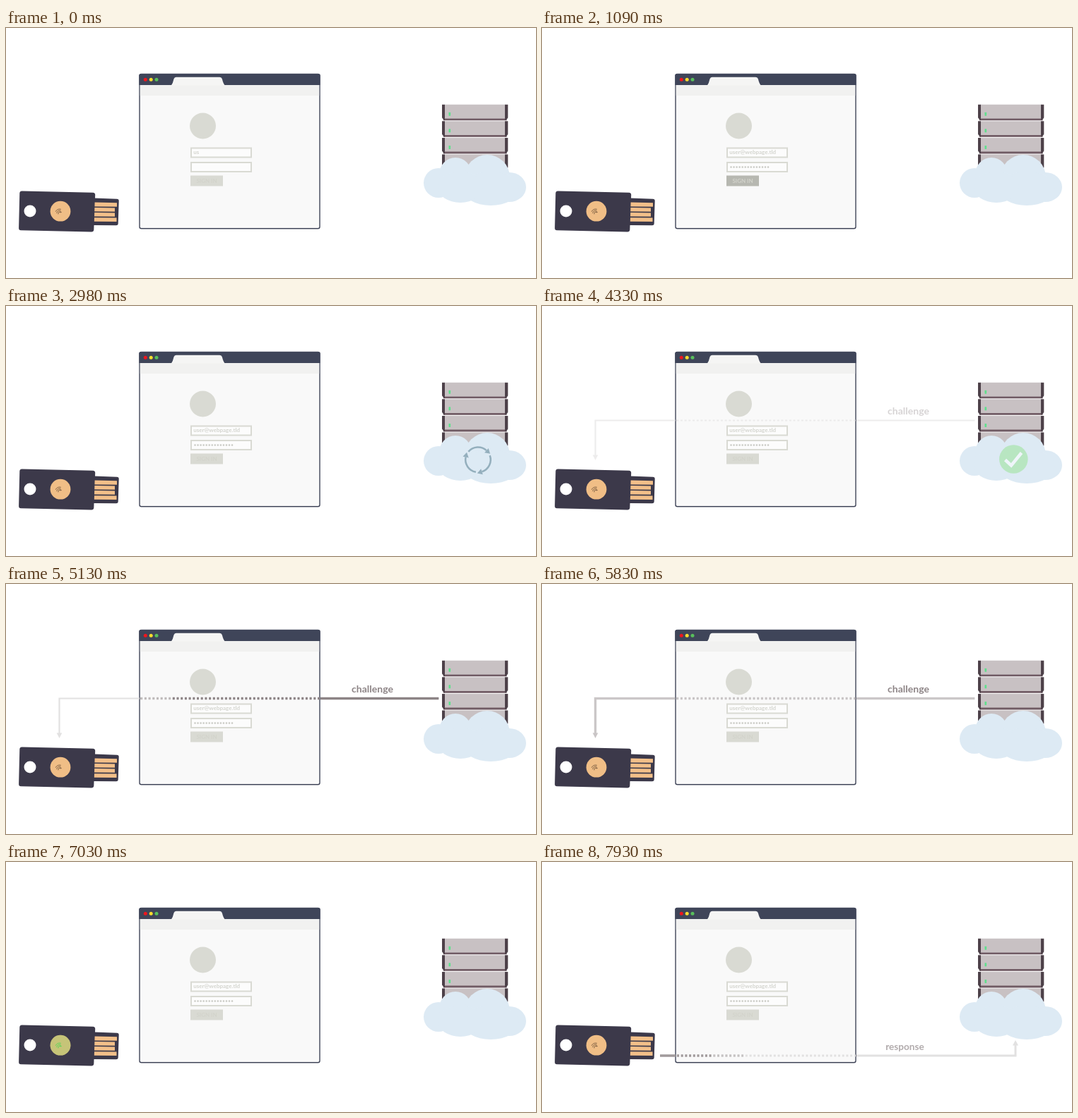
An HTML page that plays this animation: 750x355 px, repeating every 8000 ms.

```html
<!DOCTYPE html>
<html lang="en">
<head>
<meta charset="utf-8">
<title>Security key login</title>
<style>
  html, body { margin: 0; width: 100%; height: 100%; overflow: hidden; background: #fff; }
  svg { display: block; width: 100vw; height: 100vh; }
  text { font-family: Lato, "Open Sans", sans-serif; }
  .label { font-weight: 700; font-size: 14px; fill: #8d8486; text-anchor: middle; }
</style>
</head>
<body>
<svg id="stage" viewBox="0 0 750 355">
  <rect width="750" height="355" fill="#fff"/>

  <g id="browser">
    <rect x="189" y="65.5" width="255" height="219.3" rx="2.5" fill="#f9f9f9" stroke="#414659" stroke-width="1.4"/>
    <path d="M188.3 81V67.5Q188.3 65 191 65H442Q444.6 65 444.6 67.5V81Z" fill="#3f4559"/>
    <rect x="189.8" y="81" width="253.4" height="15" fill="#f1f1f0"/>
    <path d="M234 81.2Q236 79 237 74Q238 69.8 241 69.8H302Q305 69.8 306 73Q307.500 79 309.500 81.200Z" fill="#f5f5f4"/>
    <circle cx="197.300" cy="73.200" r="2.500" fill="#ef151d"/>
    <circle cx="205.200" cy="73.200" r="2.500" fill="#f7dc2d"/>
    <circle cx="213" cy="73.200" r="2.500" fill="#58c05c"/>
    <circle cx="278.500" cy="139" r="18.500" fill="#d9dad3"/>
    <g fill="#fcfcfc" stroke="#d9dad3" stroke-width="2">
      <rect x="262" y="170.500" width="85" height="13"/>
      <rect x="262" y="191" width="85" height="13"/>
    </g>
    <rect id="button" x="261" y="209.500" width="46" height="15" fill="#d9dad3"/>
    <text x="284" y="220" font-size="8" font-weight="700" text-anchor="middle" fill="#d2d3cb">SIGN IN</text>
    <text id="mail" x="265.300" y="179.300" font-size="8" font-weight="700" fill="#d3d4ce"></text>
    <g id="dots" fill="#c9cac4"></g>
  </g>

  <g id="key">
    <path d="M124 241.500L157 242.800Q159.800 243 159.700 245.500L158.700 278Q158.500 280.300 156 280.300L123 280Z" fill="#3c394a"/>
    <path d="M22.500 231.500L123 233.700Q126.300 234 126.200 237L124.300 286.500Q124 289.500 121 289.500L21 287.300Q18 287 18.100 284L19.300 234.500Q19.500 231.500 22.500 231.500Z" fill="#3c394a"/>
    <g fill="#f2bf89">
      <path d="M125.600 247.600L157 248.200V253.800L125.400 253.400Z"/>
      <path d="M125.400 255L154 255.400V260.700L125.200 260.400Z"/>
      <path d="M125.200 262.100L154 262.400V267.700L125 267.500Z"/>
      <path d="M125 269.200L156.500 269.400V275L124.800 274.800Z"/>
    </g>
    <circle cx="34" cy="260" r="8.500" fill="#fff"/>
    <circle id="halo" cx="77" cy="260" r="19.500" fill="#6fd673"/>
    <circle cx="77" cy="260.200" r="14.400" fill="#f0be86"/>
    <circle id="glow" cx="77" cy="260.200" r="14.400" fill="#93cd69"/>
    <g id="waves" fill="none" stroke-width="0.900" stroke-linecap="round">
      <path d="M70.300 260.500Q72.500 256.300 77.300 257.200M71.800 262.800Q72.700 258.600 77 259.100M73.800 264Q73.600 261 76.500 260.800"/>
      <circle cx="77.300" cy="261.500" r="0.600"/>
    </g>
  </g>

  <g id="server"></g>
  <g fill="#ddeaf4">
    <ellipse cx="612" cy="220" rx="21" ry="21"/>
    <ellipse cx="636" cy="208" rx="23" ry="24"/>
    <ellipse cx="681" cy="212" rx="32" ry="32"/>
    <ellipse cx="712" cy="226" rx="24" ry="21"/>
    <ellipse cx="686" cy="228" rx="40" ry="24"/>
    <ellipse cx="643" cy="226" rx="32" ry="22"/>
  </g>

  <g id="spinner"></g>
  <g id="check">
    <circle cx="667.300" cy="217.500" r="20.300" fill="#9be39a"/>
    <path d="M655.500 218.500L664 226.500L678.500 208.500" fill="none" stroke="#fff" stroke-width="4.500"/>
  </g>
  <g id="arrows"></g>
</svg>

<script>
const LOOP = 8000;
const NS = 'http://www.w3.org/2000/svg';
const $ = id => document.getElementById(id);
const clamp = v => Math.max(0, Math.min(1, v));
const ramp = (t, a, b) => clamp((t - a) / (b - a));

function add(parent, tag, attrs, text) {
  const el = document.createElementNS(NS, tag);
  for (const k in attrs) el.setAttribute(k, attrs[k]);
  if (text) el.textContent = text;
  parent.appendChild(el);
  return el;
}

// Static parts built by rule
for (let i = 0; i < 4; i++) {
  const g = add($('server'), 'g', { transform: `translate(0 ${108.7 + i * 23.6})` });
  add(g, 'rect', { x: 620.5, width: 86, height: 20, fill: '#c8c1c3' });
  add(g, 'path', { d: 'M620 19.700H707L709 22.500H618.500Z', fill: '#705b64' });
  add(g, 'path', { d: 'M617 0H621V22H619.500L617 18.500ZM706 0H710.300V18.500L708 22H706Z', fill: '#4d4149' });
  add(g, 'rect', { x: 626.5, y: 11, width: 2.6, height: 5, rx: 0.6, fill: '#5fe08c' });
}

const dots = [];
for (let i = 0; i < 14; i++)
  dots.push(add($('dots'), 'circle', { cx: 267.5 + i * 4.04, cy: 197.6, r: 1.25 }));

for (let i = 0; i < 3; i++) {
  const g = add($('spinner'), 'g', { transform: `rotate(${i * 120})` });
  const a = 92 * Math.PI / 180, r = 17.8;
  const x = r * Math.cos(a), y = r * Math.sin(a);
  add(g, 'path', { d: `M${r} 0A${r} ${r} 0 0 1 ${x} ${y}`, fill: 'none', stroke: '#94afbd', 'stroke-width': 2.5 });
  add(g, 'path', { d: 'M0 -4.200L0 4.200L-7 0Z', fill: '#94afbd', transform: `translate(${x} ${y}) rotate(2)` });
}

// Arrows: a pale base, and a dark copy revealed along the route
const SOFT = 45;
const arrows = [
  { text: 'login:password', size: 14.5, tx: 529, ty: 86, start: 1490, speed: 0.45, len: 248,
    fade: [2330, 2680], textFade: [2330, 2680], base: 3,
    solid: 'M451 69H662.500V100', dotted: '', head: 'M658.300 98.500H666.700L662.500 106Z',
    route: 'M451 69H662.500V106' },
  { text: 'challenge', size: 14, tx: 518.5, ty: 154, start: 4330, speed: 0.53, len: 594,
    fade: [5530, 6030], textFade: [6030, 6330], base: 2.2,
    solid: 'M612.500 162.500H445M189 162.500H75.500V213', dotted: 'M444 162.500H189', head: 'M71.700 211.500H79.300L75.500 219Z',
    route: 'M612.500 162.500H75.500V219' },
  { text: 'response', size: 13.6, tx: 513.5, ty: 267, start: 7668, speed: 0.45, len: 525,
    fade: [9000, 9500], textFade: [9000, 9500], base: 3,
    solid: 'M167 275H189M445 275H670V259', dotted: 'M191 275H444', head: 'M666 260.500H674L670 253Z',
    route: 'M167 275H670V253' }
];

arrows.forEach((a, i) => {
  const root = $('arrows');
  const draw = (color, width, extra) => {
    const g = add(root, 'g', extra);
    const line = { fill: 'none', stroke: color, 'stroke-width': width };
    add(g, 'path', { d: a.solid, ...line });
    if (a.dotted) add(g, 'path', { d: a.dotted, ...line, 'stroke-dasharray': '3 2.7' });
    add(g, 'path', { d: a.head, fill: color });
    return g;
  };
  const mask = add(root, 'mask', { id: 'wipe' + i, maskUnits: 'userSpaceOnUse', x: 0, y: 0, width: 750, height: 355 });
  const band = opacity => add(mask, 'path', { d: a.route, fill: 'none', stroke: '#fff', 'stroke-width': 12, 'stroke-opacity': opacity });
  a.tip = band(0.45);
  a.body = band(1);
  a.pale = draw('#e2e1e1', a.base, {});
  a.dark = draw('#8d8486', 3.5, { mask: `url(#wipe${i})` });
  a.label = add(root, 'text', { class: 'label', x: a.tx, y: a.ty, style: `font-size:${a.size}px` }, a.text);
});

// The picture advances in held steps
function hold(t) {
  const snap = (from, step) => from + Math.floor((t - from) / step) * step;
  if (t < 200) return 0;
  if (t < 950) return snap(200, 150);
  if (t < 1730) return snap(950, 780 / 9);
  if (t < 2530) return snap(1730, 100);
  if (t < 3430) return snap(2530, 150);
  return snap(3430, 100);
}

function show(el, opacity) {
  el.setAttribute('opacity', opacity.toFixed(3));
  el.setAttribute('display', opacity > 0 ? 'inline' : 'none');
}

const MAIL = 'user@webpage.tld';

function render(time) {
  const t = hold(time);

  const typed = t < 200 ? 2 : t < 350 ? 5 : t < 500 ? 14 : 16;
  $('mail').textContent = MAIL.slice(0, typed);
  const shown = t < 500 ? 0 : t < 650 ? 1 : t < 800 ? 7 : 14;
  dots.forEach((d, i) => d.setAttribute('display', i < shown ? 'inline' : 'none'));

  const press = ramp(t, 860, 1030) * (1 - ramp(t, 1120, 1380));
  const tone = (c, drop) => Math.round(c - drop * press);
  $('button').setAttribute('fill', `rgb(${tone(217, 34)},${tone(218, 34)},${tone(211, 34)})`);

  for (const a of arrows) {
    const dt = t - a.start;
    const out = 1 - ramp(t, ...a.fade);
    const tip = Math.max(0, dt * a.speed);
    const full = tip >= a.len ? tip : Math.max(0, tip - SOFT);
    a.tip.setAttribute('stroke-dasharray', `${tip} 2000`);
    a.body.setAttribute('stroke-dasharray', `${full} 2000`);
    show(a.pale, clamp(0.6 + dt / 600) * out);
    show(a.dark, tip > 0 ? clamp(0.5 + dt / 1000) * out : 0);
    show(a.label, clamp(0.35 + dt / 800) * (1 - ramp(t, ...a.textFade)));
  }

  show($('spinner'), ramp(t, 2330, 2680) * (1 - ramp(t, 3130, 3480)));
  $('spinner').setAttribute('transform', `translate(668 218.300) rotate(${(t - 2980) * 0.2 - 20})`);
  show($('check'), ramp(t, 3180, 3530) * (1 - ramp(t, 4230, 4455)));

  const green = ramp(t, 6280, 6680) * (1 - ramp(t, 6830, 7230));
  show($('glow'), green * 0.9);
  show($('halo'), ramp(t, 6430, 6630) * (1 - ramp(t, 6730, 6930)) * 0.3);
  $('waves').setAttribute('stroke', green > 0.2 ? '#52d557' : '#76583f');
}

function tick(now) {
  render(now % LOOP);
  requestAnimationFrame(tick);
}
render(0);
requestAnimationFrame(tick);
</script>
</body>
</html>
```
